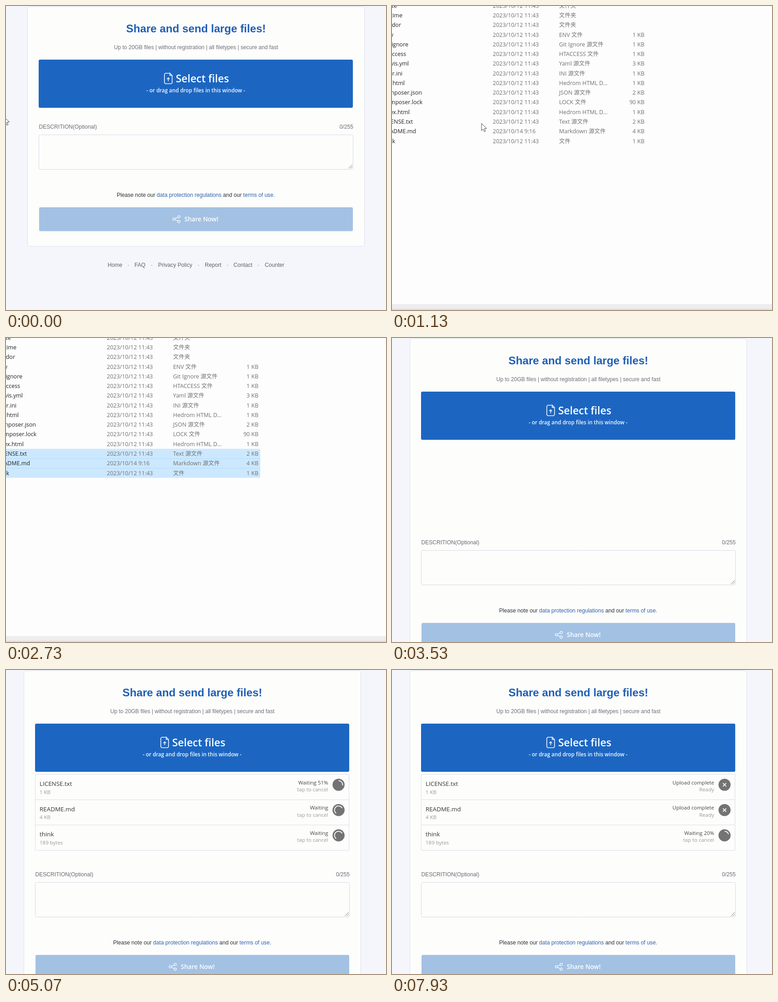
Recreate the animation shown at these times as an HTML page with a canvas. Size 837 by 669 pixels, loop 8 s.

```html
<!DOCTYPE html>
<html lang="en">
<head>
<meta charset="utf-8">
<title>File sharing demo</title>
<style>
html, body { margin: 0; width: 100%; height: 100%; overflow: hidden; background: #f4f6fb; }
canvas { display: block; }
</style>
</head>
<body>
<canvas id="stage" width="837" height="669"></canvas>
<script>
const W = 837, H = 669, LOOP = 8000, STEP = 1000 / 15;
const ctx = document.getElementById('stage').getContext('2d');
const ARIAL = '"Liberation Sans", Arial, sans-serif';
const UI = '"Open Sans", "Noto Sans CJK SC", "Noto Sans CJK", sans-serif';
const BLUE = '#1c66c2', PAPER = '#fdfdfc';

const clamp = v => Math.max(0, Math.min(1, v));
const ramp = (t, a, b) => clamp((t - a) / (b - a));
const ease = k => k * k * (3 - 2 * k);
const mix = (a, b, k) => a + (b - a) * k;

function text(str, x, y, font, color, align = 'left') {
  ctx.font = font;
  ctx.fillStyle = color;
  ctx.textAlign = align;
  ctx.fillText(str, x, y);
}

function rect(x, y, w, h, color) {
  ctx.fillStyle = color;
  ctx.fillRect(x, y, w, h);
}

function round(x, y, w, h, r, fill, stroke) {
  ctx.beginPath();
  ctx.roundRect(x, y, w, h, r);
  ctx.fillStyle = fill;
  ctx.fill();
  if (stroke) line(stroke, 1);
}

function line(color, width) {
  ctx.strokeStyle = color;
  ctx.lineWidth = width;
  ctx.stroke();
}

function poly(points) {
  points.forEach(([x, y], i) => i ? ctx.lineTo(x, y) : ctx.moveTo(x, y));
}

function dot(x, y, r) {
  ctx.moveTo(x + r, y);
  ctx.arc(x, y, r, 0, Math.PI * 2);
}

// Upload page

function fileIcon(x, y) {
  ctx.beginPath();
  poly([[x + 13, y], [x + 3, y], [x + 1, y + 2], [x + 1, y + 21], [x + 3, y + 23],
        [x + 16, y + 23], [x + 18, y + 21], [x + 18, y + 5], [x + 13, y], [x + 13, y + 5], [x + 18, y + 5]]);
  poly([[x + 9.5, y + 17.5], [x + 9.5, y + 10]]);
  poly([[x + 6.5, y + 13], [x + 9.5, y + 10], [x + 12.5, y + 13]]);
  line('#f4f8fd', 1.6);
}

function shareIcon(x, y) {
  ctx.beginPath();
  dot(x - 5.5, y, 2.6);
  dot(x + 5.2, y - 5, 2.6);
  dot(x + 5.2, y + 5.4, 2.6);
  poly([[x - 3, y - 1.2], [x + 2.8, y - 3.9]]);
  poly([[x - 3, y + 1.2], [x + 2.8, y + 4.2]]);
  line('#f4f8fd', 1.4);
}

const FOOTER = [['Home', 224], ['FAQ', 283], ['Privacy Policy', 335],
                ['Report', 438], ['Contact', 501], ['Counter', 570]];
const FOOTER_DOTS = [269.5, 321, 424, 488, 556];

function page(shift, drop) {
  const small = '12.1px ' + ARIAL;
  rect(0, 0, W, H, '#f4f6fb');
  ctx.save();
  ctx.translate(shift, 0);
  round(47.5, 1.5, 742, 527.5 + drop, 4, PAPER, '#dde1ec');
  text('Share and send large files!', 418.5, 58, 'bold 24.2px ' + ARIAL, '#1f5fb4', 'center');
  text('Up to 20GB files | without registration | all filetypes | secure and fast',
       418.5, 94.5, small, '#6b7076', 'center');
  round(72, 118, 692, 106, 3, BLUE);
  fileIcon(348, 148);
  text('Select files', 374, 167.5, '600 22.9px ' + UI, '#fff', 'left');
  text('- or drag and drop files in this window -', 418, 190, '600 11.6px ' + UI, '#f4f8fd', 'center');

  ctx.translate(0, drop);
  text('DESCRITION(Optional)', 72.5, 269.5, small, '#666b73');
  text('0/255', 765, 269.5, small, '#666b73', 'right');
  round(72.5, 283.5, 692, 76, 3, PAPER, '#d5d9e6');
  ctx.beginPath();
  poly([[754.5, 357.5], [763, 349]]);
  poly([[759, 357.5], [763, 353.5]]);
  line('#777', 1);

  let x = 244;
  const note = [['Please note our ', '#2d3036'], ['data protection regulations', '#2f62ad'],
                [' and our ', '#2d3036'], ['terms of use.', '#2f62ad']];
  for (const [part, color] of note) {
    text(part, x, 420, small, color);
    x += ctx.measureText(part).width;
  }
  round(73, 443, 691, 52.5, 3, '#a3c1e3');
  shareIcon(375.5, 469);
  text('Share Now!', 393, 474, '600 13.6px ' + UI, '#fff');
  for (const [label, fx] of FOOTER) text(label, fx, 574, small, '#5d6268');
  for (const fx of FOOTER_DOTS) text('·', fx, 574, small, '#5d6268', 'center');
  ctx.restore();
}

// Upload queue

const QUEUE = [
  { name: 'LICENSE.txt', size: '1 KB', start: 4330, time: 1430 },
  { name: 'README.md', size: '4 KB', start: 5900, time: 1450 },
  { name: 'think', size: '189 bytes', start: 7500, time: 2110 }
];

function queueItem(item, i, t) {
  const y = 229.5 + i * 55.7, p = (t - item.start) / item.time;
  const done = p >= 1, active = p >= 0 && !done;
  const status = done ? 'Upload complete' : active ? `Waiting ${Math.floor(p * 100)}%` : 'Waiting';
  text(item.name, 74, y + 25.5, '13.4px ' + UI, '#333');
  text(item.size, 74, y + 43, '11.5px ' + UI, '#999');
  text(status, 709.5, y + 22, '11.5px ' + UI, '#444', 'right');
  text(done ? 'Ready' : 'tap to cancel', 709.5, y + 37.5, '11.5px ' + UI, '#999', 'right');

  const cx = 732.5, cy = y + 23, turn = Math.PI * 2;
  ctx.beginPath();
  dot(cx, cy, 13.3);
  ctx.fillStyle = '#737373';
  ctx.fill();
  ctx.beginPath();
  if (done) {
    poly([[cx - 3.6, cy - 3.6], [cx + 3.6, cy + 3.6]]);
    poly([[cx + 3.6, cy - 3.6], [cx - 3.6, cy + 3.6]]);
  } else if (active) {
    ctx.arc(cx, cy, 9, -turn / 4, turn * (Math.min(p * 1.2, 0.15 + 0.25 * p) - 0.25));
  } else {
    const from = turn * (0.35 + (t - 5066.7) / 650);
    ctx.arc(cx, cy, 9, from, from + turn * 0.57);
  }
  line('#f2f2f2', 2);
}

function queue(t) {
  ctx.save();
  ctx.globalAlpha = ramp(t, 3560, 3860);
  ctx.beginPath();
  ctx.rect(64.5, 229.5, 691, 167.5);
  poly([[65, 285.5], [755, 285.5]]);
  poly([[65, 341], [755, 341]]);
  line('#d6deeb', 1);
  QUEUE.forEach((item, i) => queueItem(item, i, t));
  ctx.restore();
}

// File dialog: name, right edge of name, type, size

const FILES = [
  ['route', 11, '文件夹', ''],
  ['runtime', 23, '文件夹', ''],
  ['vendor', 20, '文件夹', ''],
  ['.env', 3, 'ENV 文件', '1 KB'],
  ['.gitignore', 36, 'Git Ignore 源文件', '1 KB'],
  ['.htaccess', 31, 'HTACCESS 文件', '1 KB'],
  ['.travis.yml', 37, 'Yaml 源文件', '3 KB'],
  ['.user.ini', 23, 'INI 源文件', '1 KB'],
  ['errors.html', 28, 'Hedrom HTML D...', '1 KB'],
  ['composer.json', 66, 'JSON 源文件', '2 KB'],
  ['composer.lock', 67, 'LOCK 文件', '90 KB'],
  ['index.html', 39, 'Hedrom HTML D...', '1 KB'],
  ['LICENSE.txt', 46, 'Text 源文件', '2 KB'],
  ['README.md', 53, 'Markdown 源文件', '4 KB'],
  ['think', 7, '文件', '1 KB']
];
const ROW = 21.27;

function dialog(t) {
  const font = '12.5px ' + UI, grey = '#707070';
  const drag = ease(ramp(t, 1530, 1800));
  const left = mix(206, 101.5, drag), top = mix(345, 257, drag);
  rect(0, 0, W, H, '#fdfdfd');
  rect(0, 656, W, 13, '#ededef');
  rect(0, 667, W, 1, '#c9c9cc');
  FILES.forEach(([name, edge, type, size], i) => {
    const mid = 20.5 + (i - 1) * ROW, y = mid + 4.5;
    if (i > 11 && drag > 0 && top < mid + ROW / 2) {
      rect(0, mid - ROW / 2, 560, ROW, '#cce8ff');
      if (i > 12) rect(0, Math.round(mid - ROW / 2), 560, 1, '#b3dcfa');
    }
    const date = name === 'README.md' ? '2023/10/14 9:16' : '2023/10/12 11:43';
    text(name, edge, y, font, '#222', 'right');
    text(date, 222, y, font, grey);
    text(type, 368, y, font, grey);
    text(size, 556, y, font, grey, 'right');
  });
  if (drag > 0 && t < 2050) {
    rect(left, top, 206 - left, 345 - top, 'rgba(0,102,204,.34)');
    ctx.strokeStyle = '#2a7fd2';
    ctx.lineWidth = 1;
    ctx.strokeRect(left, top - 0.5, 206 - left - 0.5, 345 - top);
  }
}

function dialogOpening(k) {
  ctx.save();
  ctx.globalAlpha = k;
  ctx.beginPath();
  ctx.rect(0, 0, W, 656);
  ctx.rect(0, 0, 434, 320);
  ctx.rect(0, 320, 98, 13);
  ctx.fillStyle = '#eeeeed';
  ctx.fill('evenodd');
  rect(0, 0, 434, 320, '#fff');
  rect(0, 320, 98, 13, '#fff');
  rect(0, 656, W, 13, '#fff');
  ctx.restore();
  rect(106, 277, 105, 60, '#fdfdfd');
  ctx.beginPath();
  poly([[211, 277.5], [106.5, 277.5], [106.5, 302], [211, 302]]);
  line('#8cc0ea', 1.5);
  rect(110, 283, 1.3, 16, '#333');
}

// Pointer

const PATH = [[0, -4, 244], [450, 196, 196], [650, 196, 196], [867, 194, 222], [1000, 194, 228],
              [1400, 206, 345], [1530, 206, 345], [1800, 101, 257], [2050, 101, 257], [2550, 520, 690]];

function pointer(t) {
  const i = PATH.findIndex(p => p[0] > t);
  if (i < 1) return;
  const [t0, x0, y0] = PATH[i - 1], [t1, x1, y1] = PATH[i];
  const k = ease(ramp(t, t0, t1)), x = mix(x0, x1, k), y = mix(y0, y1, k);
  ctx.beginPath();
  poly([[0, 0], [0, 16], [3.8, 12.6], [6.4, 18.4], [8.8, 17.3], [6.3, 11.6], [11.3, 11.3]]
    .map(([a, b]) => [x + a, y + b]));
  ctx.closePath();
  ctx.fillStyle = '#fff';
  ctx.fill();
  line('#444', 1);
}

function draw(t) {
  if (t < 990) {
    page(0, 0);
    const k = [0.3, 0.6, 0.85][Math.round((t - 800) / STEP)];
    if (k) dialogOpening(k);
  } else if (t < 3130) {
    dialog(t);
  } else {
    const open = ease(ramp(t, 3300, 3500));
    page(open > 0.5 ? -8 : 0, 184 * open);
    queue(t);
    const fade = 1 - ramp(t, 3130, 3270);
    if (fade > 0) {
      ctx.globalAlpha = fade;
      rect(0, 0, W, H, '#fdfdfd');
      ctx.globalAlpha = 1;
    }
  }
  pointer(t);
}

const began = performance.now();
function tick() {
  const t = (performance.now() - began) % LOOP;
  // 15 pictures per second
  draw(Math.floor((t + 5) / STEP) * STEP);
  requestAnimationFrame(tick);
}
tick();
</script>
</body>
</html>
```
